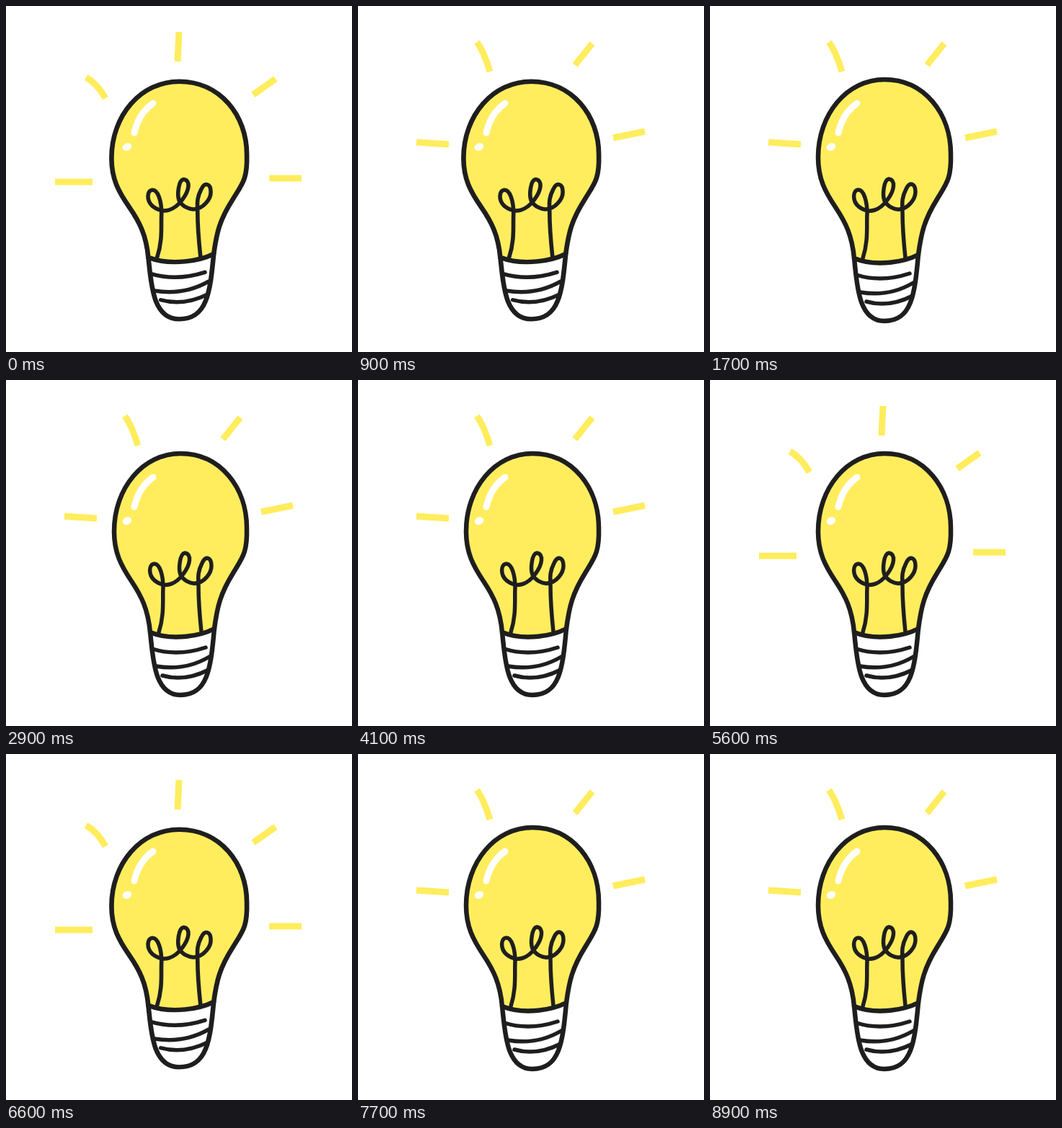
An HTML page for the animation above (9 s loop, 480 by 480 pixels).

```html
<!DOCTYPE html>
<html lang="en">
<head>
<meta charset="utf-8">
<title>Light bulb</title>
<style>
  html, body { margin: 0; width: 100%; height: 100%; overflow: hidden; background: #fff; }
  svg { display: block; width: 100vw; height: 100vh; fill: none; stroke-linejoin: round; }
  .ray { stroke: #ffed5e; stroke-width: 9; }
  .ink { stroke: #1f1e1f; stroke-width: 6.5; stroke-linecap: round; }
  .fine { stroke-width: 5.5; }
  .shine { stroke: #fff; stroke-width: 9; stroke-linecap: round; }
</style>
</head>
<body>
<svg viewBox="0 0 480 480">
  <path class="ray" d="M240 36 L238 77 M111 99 Q126 107 138 128 M374 101 L343 123 M68 244 H120 M365 239 H410"/>
  <path class="ray" d="M165 50 Q175 64 183 91 M325 52 L301 82 M81 189 L126 192 M354 183 L398 174"/>
  <g id="bulb" class="ink">
    <path fill="#fff" d="M200 350 C204 385 205 437 242 437 C280 437 284 400 289 345"/>
    <path class="fine" d="M203 373 Q238 384 277 371 M208 397 Q248 404 282 384 M217 410 Q248 419 281 402"/>
    <path fill="#ffed5e" d="M200 350 C197 318 188 300 174 279 C160 258 150 240 150 210
      C150 150 190 102 242 102 C298 102 334 150 334 205 C335 240 328 246 315 268
      C297 297 293 315 289 345 C272 354 232 363 200 350 Z"/>
    <path class="fine" d="M212 350 C220 325 217 305 218 288 C218 270 213 255 206 255
      C198 255 197 270 206 278 C221 290 236 283 246 269 C256 256 258 241 248 240
      C241 241 239 262 242 270 C246 278 256 283 263 282 C275 281 285 268 285 258
      C285 246 277 243 272 254 C265 268 267 275 267 285 C267 310 269 330 271 349"/>
  </g>
  <path class="shine" d="M204 135 Q184 149 178 176"/>
  <ellipse cx="168" cy="195.500" rx="6.500" ry="5" fill="#fff" transform="rotate(-20 168 195.500)"/>
</svg>
<script>
const STEP = 100, FRAMES = 90, POSES = 3;
const rays = document.querySelectorAll('.ray');
const bulb = document.getElementById('bulb');

// Squash grows towards the left and towards both ends of the bulb.
function squash(amount) {
  const sx = 1 + 0.02 * amount, sy = 1 - 0.016 * amount;
  return `translate(330 270) scale(${sx} ${sy}) translate(-330 -270)`;
}

// The ray sets alternate every step; the bulb wobbles over three.
function draw(frame) {
  rays.forEach((ray, i) => ray.style.display = frame % rays.length === i ? '' : 'none');
  bulb.setAttribute('transform', squash(1 - (frame % POSES) / (POSES - 1)));
}

const begin = performance.now();
function tick() {
  draw(Math.floor((performance.now() - begin) / STEP) % FRAMES);
  requestAnimationFrame(tick);
}
tick();
</script>
</body>
</html>
```
